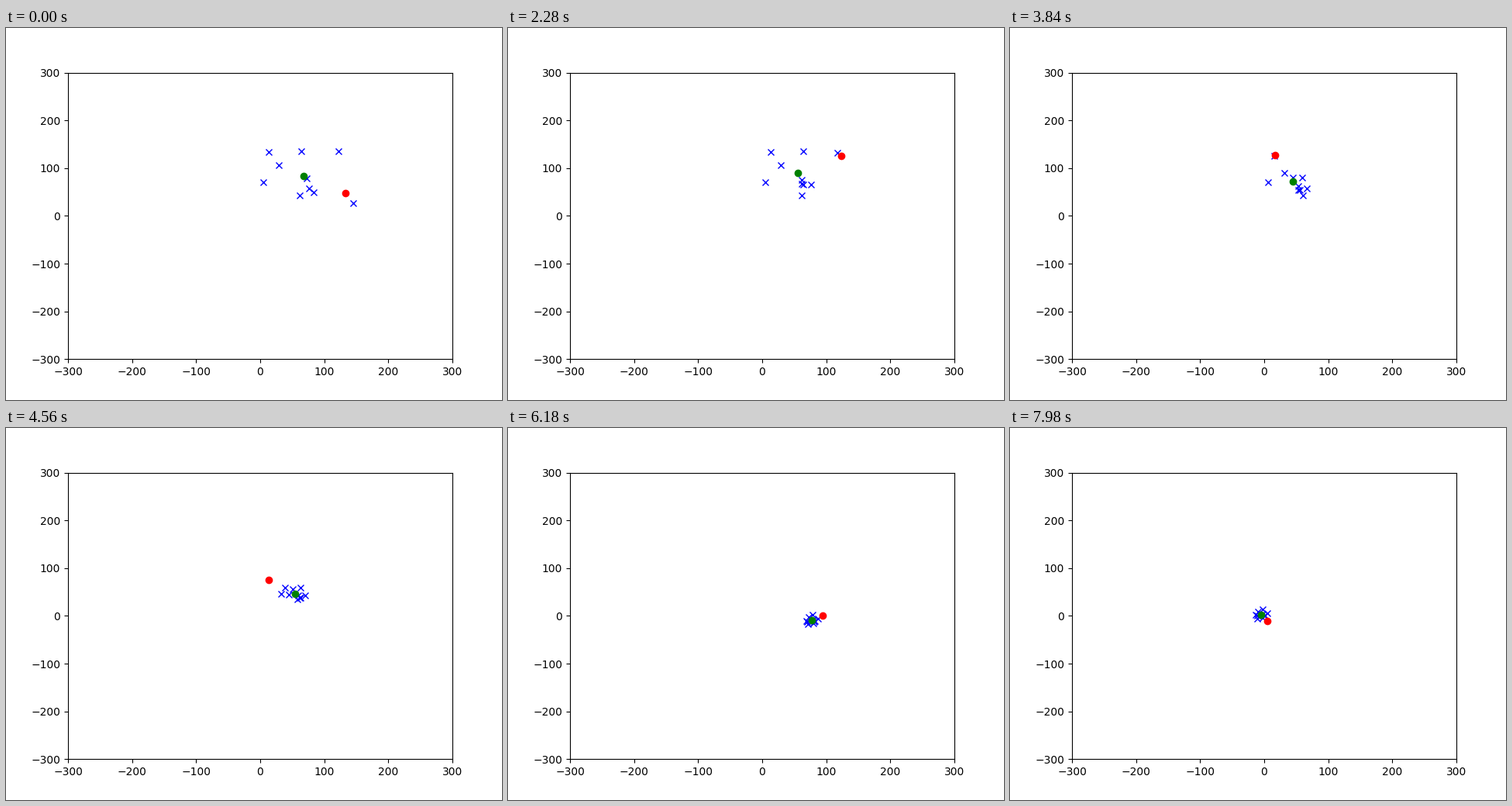
Write a matplotlib script that moves like this. It is 640 px wide and 480 px high and loops after 8 s.

```python
import numpy as np
import matplotlib.pyplot as plt
from matplotlib.animation import FuncAnimation

WIDTH, HEIGHT, DPI = 640, 480, 100
LOOP_MS, TICK_MS, STEP_MS = 8000, 20, 60
GLIDE = 22  # steps a sheep needs to join the herd

# Home of each sheep in stage pixels, and the step at which it starts to join.
SHEEP = np.array([
    (339, 160, 59), (352, 177, 54), (332, 199, 62), (381, 159, 36),
    (429, 159, 34), (388, 194, 14), (391, 207, 8), (397, 212, 6),
    (379, 216, 60), (448, 226, 3)])
HOME, START = SHEEP[:, :2], SHEEP[:, 2]

# Key points (step, x, y) of the herd's centre and of the dog.
HERD = [(0, 385, 196), (22, 385, 196), (53, 367, 194), (76, 374, 215),
        (92, 394, 231), (98, 397, 241), (113, 369, 256.5), (133, 324, 240.5)]
DOG = [(0, 438, 213), (14, 441, 234), (22, 436, 214), (42, 422, 158),
       (53, 381, 158), (66, 338, 167), (76, 339, 196), (92, 391, 217),
       (101, 406, 238), (113, 387, 260), (133, 332, 249)]


def smooth(u):
    u = np.clip(u, 0, 1)
    return u * u * (3 - 2 * u)


def follow(path, step):
    """Smooth cubic curve through the key points."""
    path = np.array(path, float)
    t, points = path[:, 0], path[:, 1:]
    slopes = np.gradient(points, t, axis=0)
    k = min(np.searchsorted(t, step, side="right"), len(t) - 1) - 1
    span = t[k + 1] - t[k]
    u = (step - t[k]) / span
    bend = slopes[k] * (1 - u) - slopes[k + 1] * u
    return (points[k] + (points[k + 1] - points[k]) * smooth(u)
            + span * u * (1 - u) * bend)


def flock_at(step):
    # Each sheep keeps its bearing in the herd, which tightens and turns.
    away = HOME - HOME.mean(axis=0)
    bearing = np.arctan2(away[:, 1], away[:, 0])
    radius = np.sqrt(np.hypot(away[:, 0], away[:, 1]))
    spread = np.interp(step, [53, 92], [2.2, 0.95])
    angle = bearing - np.radians(np.interp(step, [53, 92], [0, 40]))
    spot = np.column_stack([np.cos(angle), np.sin(angle)])
    herd = follow(HERD, step) + spread * radius[:, None] * spot
    joined = smooth((step - START) / GLIDE)[:, None]
    return HOME + (herd - HOME) * joined


fig, ax = plt.subplots(figsize=(WIDTH / DPI, HEIGHT / DPI), dpi=DPI)
ax.set_xlim(-300, 300)
ax.set_ylim(-300, 300)
sheep, = ax.plot([], [], "bx")
dog, = ax.plot([], [], "ro")
middle, = ax.plot([], [], "go")


def place(line, points):
    points = np.atleast_2d(points)
    stage = np.column_stack([points[:, 0], HEIGHT - points[:, 1]])
    line.set_data(*ax.transData.inverted().transform(stage).T)


def draw(tick):
    step = tick * TICK_MS // STEP_MS
    flock = flock_at(step)
    place(sheep, flock)
    place(dog, follow(DOG, step))
    place(middle, flock.mean(axis=0))
    return sheep, dog, middle


anim = FuncAnimation(fig, draw, frames=LOOP_MS // TICK_MS, interval=TICK_MS,
                     repeat=True, repeat_delay=0, blit=True)
plt.show()
```
